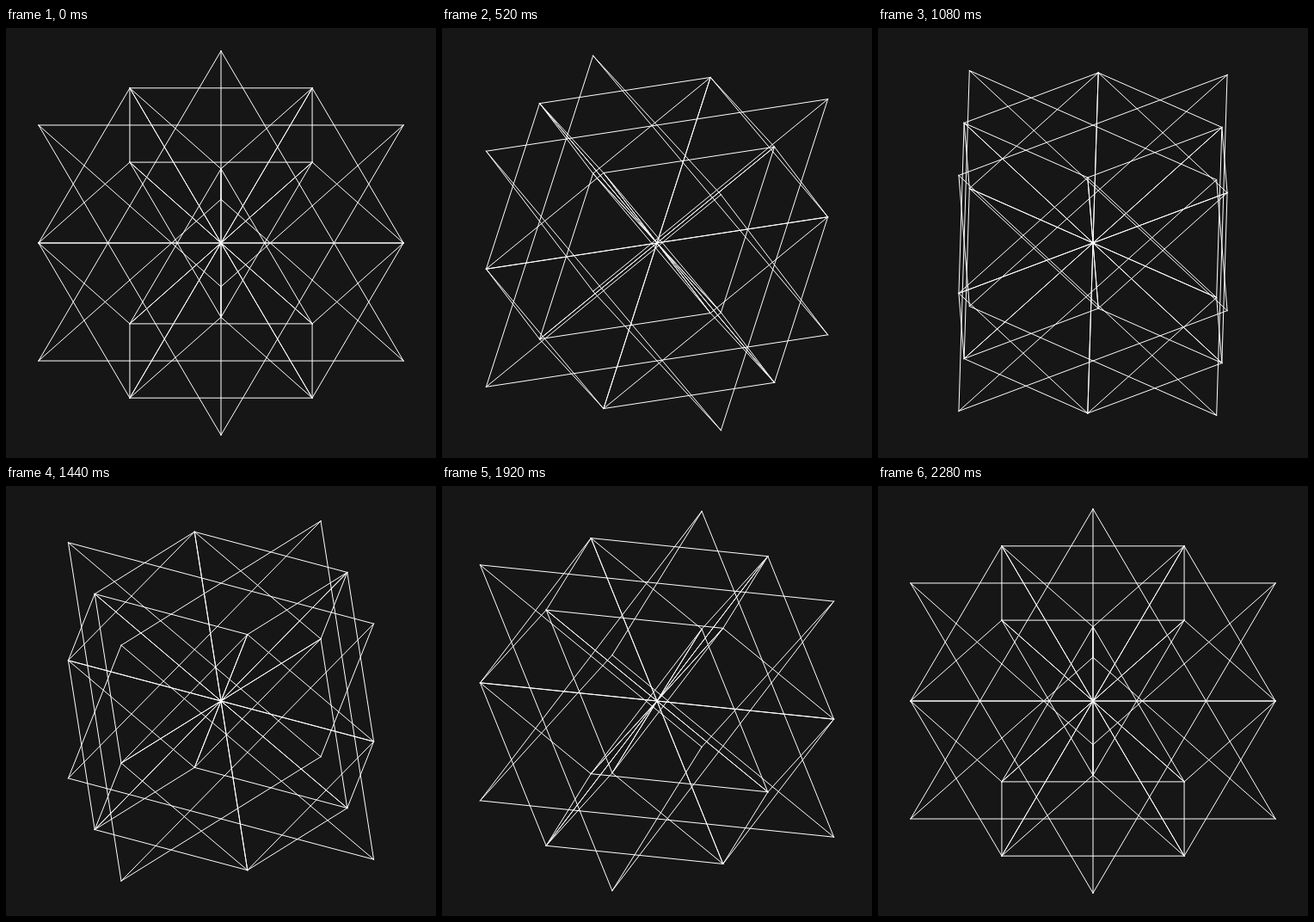
These frames come from a looping animation (500x500 px, 2400 ms). An HTML page with a canvas:

```html
<!DOCTYPE html>
<html>
<head>
<meta charset="utf-8">
<style>
html, body { margin: 0; width: 100%; height: 100%; overflow: hidden; background: #161616; }
canvas { display: block; }
</style>
</head>
<body>
<canvas id="stage" width="500" height="500"></canvas>
<script>
const ctx = document.getElementById('stage').getContext('2d');
const LOOP = 2400, STEP = 40, STEPS = 57;
const HALF = 150, TILT = 24 * Math.PI / 180;

// Cube corners (3 non-zero coordinates) and edge midpoints (2 non-zero).
const points = [];
for (const x of [-1, 0, 1])
  for (const y of [-1, 0, 1])
    for (const z of [-1, 0, 1]) {
      const kind = Math.abs(x) + Math.abs(y) + Math.abs(z);
      if (kind > 1) points.push({ x, y, z, kind });
    }

// Two crossed tetrahedra, plus a cuboctahedron with its diagonals drawn twice.
const edges = [];
points.forEach((a, i) => points.slice(i + 1).forEach(b => {
  if (a.kind !== b.kind) return;
  const d2 = (a.x - b.x) ** 2 + (a.y - b.y) ** 2 + (a.z - b.z) ** 2;
  if (d2 !== 2 && d2 !== 8) return;
  edges.push([a, b]);
  if (a.kind === 2 && d2 === 8) edges.push([a, b]);
}));

function project(p, turn) {
  const c = Math.cos(turn), s = Math.sin(turn);
  const depth = p.z * c - p.x * s;
  return [
    250 + HALF * (p.x * c + p.z * s),
    250 + HALF * (p.y * Math.cos(TILT) + depth * Math.sin(TILT))
  ];
}

function draw(time) {
  const step = Math.min(STEPS, Math.floor((time % LOOP) / STEP));
  const turn = Math.PI / 4 + step / STEPS * Math.PI / 2;
  ctx.fillStyle = '#161616';
  ctx.fillRect(0, 0, 500, 500);
  ctx.strokeStyle = '#fff';
  ctx.lineWidth = 1;
  ctx.lineCap = 'square';
  for (const [a, b] of edges) {
    ctx.beginPath();
    ctx.moveTo(...project(a, turn));
    ctx.lineTo(...project(b, turn));
    ctx.stroke();
  }
}

const start = performance.now();
function tick() {
  draw(performance.now() - start);
  requestAnimationFrame(tick);
}
tick();
</script>
</body>
</html>
```
